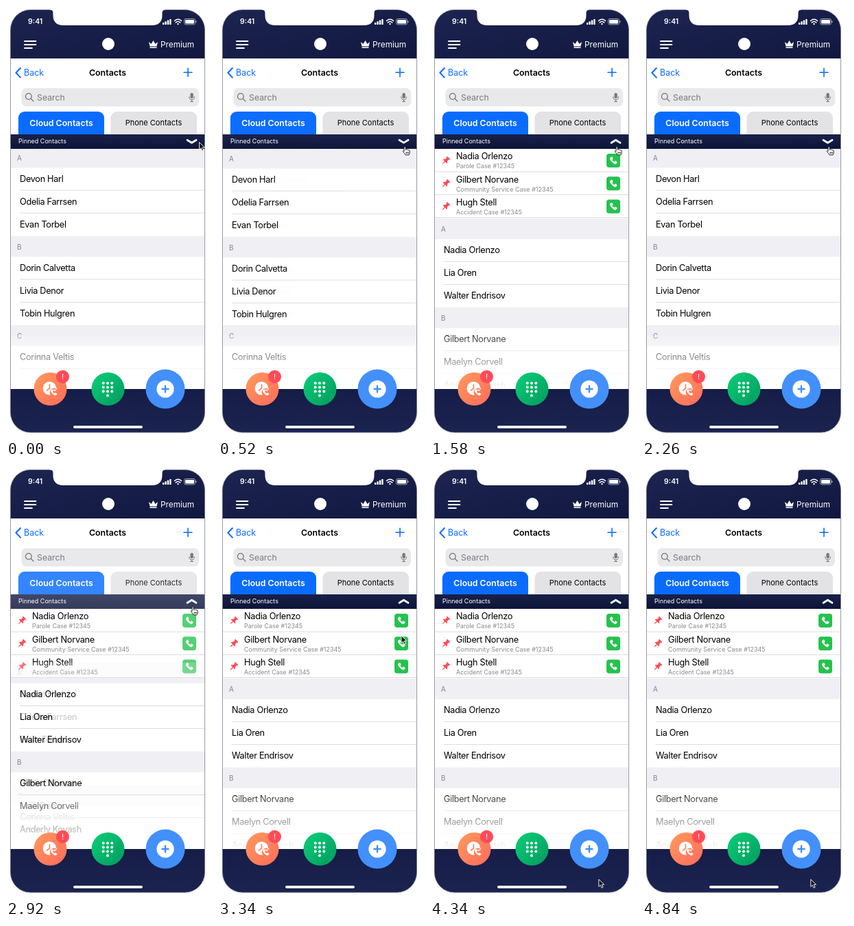
An HTML page for the animation above (4.86 s loop, 300 px wide and 626 px high).

```html
<!DOCTYPE html>
<html>
<head>
<meta charset="utf-8">
<style>
html, body { margin: 0; width: 100%; height: 100%; overflow: hidden; background: #fff }
svg { display: block; font-family: Inter, sans-serif }
.line { fill: none; stroke-linecap: round; stroke-linejoin: round }
</style>
</head>
<body>
<svg id="stage" width="300" height="626" viewBox="0 0 300 626"></svg>
<script>
const LOOP = 4860, SHIFT = 103.3, FADE = 300;
const CLICKS = [520, 1660, 2803];
const BLUE = '#0a6cff';

const text = (x, y, size, str, attrs = '') =>
  `<text x="${x}" y="${y}" font-size="${size}" ${attrs}>${str}</text>`;
const rect = (x, y, w, h, fill, r = 0) =>
  `<rect x="${x}" y="${y}" width="${w}" height="${h}" rx="${r}" fill="${fill}"/>`;
const circle = (x, y, r, fill) => `<circle cx="${x}" cy="${y}" r="${r}" fill="${fill}"/>`;
const line = (d, color, width, attrs = '') =>
  `<path class="line" d="${d}" stroke="${color}" stroke-width="${width}" ${attrs}/>`;
const name = (y, str) => text(20, y, 12.8, str, 'letter-spacing="-.35"');
const rule = y => rect(20, y, 270, .8, '#d5d5da');
const gradient = (id, stops, dir = 'x2="0" y2="1"') =>
  `<linearGradient id="${id}" ${dir}>${stops.map(([at, color, alpha = 1]) =>
    `<stop offset="${at}" stop-color="${color}" stop-opacity="${alpha}"/>`).join('')}</linearGradient>`;

const handset = (x, y, scale, color) =>
  `<path transform="translate(${x} ${y}) scale(${scale})" fill="${color}" d="M-4.8-3.4L-3-5.2Q-2.3-5.7-1.7-5
   L-.5-3.1Q-.2-2.5-.7-2L-1.6-1.2Q-.8.6 1.2 1.6L2 .7Q2.5.2 3.1.5L5 1.7Q5.7 2.3 5.2 3L3.4 4.8
   Q1.7 5.6-1.7 2.2Q-5.6-1.7-4.8-3.4Z"/>`;

const section = (y, letter) =>
  rect(7, y - 15, 283, 30, '#efeff4') + text(16, y + 4, 10, letter, 'fill="#85858b"');

// Two lettered sections of three names each
function list(names) {
  let out = section(219.5, 'A') + section(348.5, 'B');
  names.forEach((n, i) => {
    const y = 255 + i % 3 * 33.1 + (i > 2 ? 129.1 : 0);
    out += name(y, n) + (i % 3 < 2 ? rule(y + 11.6) : '');
  });
  return out;
}

function pinned(title, detail, i) {
  const y = 207 + i * 33.2;
  return text(38, y + 15.4, 12.8, title, 'letter-spacing="-.3"') +
    text(38, y + 28.4, 9, detail, 'fill="#8a8a8f"') +
    `<g transform="translate(23 ${y + 17}) rotate(45)" fill="#ff4a55">
      <path d="M-3-6H3V-4.5L2-4V-1Q4 0 4 2H.6V6.5H-.6V2H-4Q-4 0-2-1V-4L-3-4.5Z"/></g>` +
    rect(7, y + 32.8, 283, .8, '#d5d5da');
}

const callButton = y => rect(257, y - 10, 20, 20, '#25c24e', 4) + handset(267, y, 1.05, '#fff');

const tabs = rect(18, 153, 125, 44, BLUE, 9) + rect(152.5, 153, 125.5, 44, '#e3e3e6', 9) +
  text(80.5, 174, 12.4, 'Cloud Contacts', 'fill="#fff" font-weight="600" text-anchor="middle"') +
  text(215, 173.4, 11, 'Phone Contacts', 'text-anchor="middle"') +
  rect(6.5, 186, 283, 21, 'url(#bar)') +
  text(18, 199.3, 9, 'Pinned Contacts', 'fill="#fff"');

const header = rect(6, 5, 284, 71, 'url(#top)') +
  text(32, 26, 10.6, '9:41', 'fill="#fff" font-weight="600"') +
  [0, 1, 2, 3].map(i => rect(228 + i * 3.4, 24 - i * 1.7, 2.4, 3 + i * 1.7, '#fff', .6)).join('') +
  line('M245.5 21.5Q250.5 17 255.5 21.5M247.3 23.9Q250.5 21 253.7 23.9', '#fff', 1.5) +
  circle(250.5, 26, 1.2, '#fff') +
  `<rect x="259.5" y="18.5" width="16" height="8.4" rx="2.4" fill="none" stroke="#aeb1c2" stroke-width=".9"/>` +
  rect(261, 20, 13, 5.4, '#fff', 1.2) + rect(276.4, 21.2, 1.2, 3, '#aeb1c2', .6) +
  line('M27 51H43.5M27 56H43.5M27 61H38', '#fff', 1.8) +
  circle(149, 55, 9, '#fff') +
  `<path fill="#fff" d="M208 52L211.5 55L214.5 50L217.5 55L221 52L219.5 58.5H209.5ZM209.5 59.5H219.5V61H209.5Z"/>` +
  text(225, 60, 11.8, 'Premium', 'fill="#fff"');

const toolbar = line('M21 90L14.5 96.8L21 103.6', BLUE, 2) +
  text(26, 101.3, 12.5, 'Back', `fill="${BLUE}"`) +
  text(148, 100.5, 12.4, 'Contacts', 'font-weight="600" text-anchor="middle"') +
  line('M259 96.3H271M265 90.3V102.3', BLUE, 1.6) +
  rect(22.5, 119, 258.5, 26.5, '#e9e9eb', 7) +
  line('M37.3 131a4.4 4.4 0 1 0-8.8 0a4.4 4.4 0 1 0 8.8 0M36.3 134.3L40 138', '#77777c', 1.3) +
  text(45, 136.6, 12.3, 'Search', 'fill="#7b7b81"') +
  rect(268.4, 126, 4.4, 8, '#77777c', 2.2) +
  line('M266.8 131.5Q266.8 136 270.6 136T274.4 131.5M270.6 136V138.5M268.6 138.5H272.6', '#77777c', 1);

const keypad = [...Array(10).keys()].map(i => i < 9
  ? circle(141.7 + i % 3 * 6.3, 546.5 + (i / 3 | 0) * 6, 2, '#fff')
  : circle(148, 564.5, 2, '#fff')).join('');

const footer = rect(6, 555, 284, 64, 'url(#bottom)') +
  circle(64.5, 555, 24, 'url(#orange)') + circle(63.5, 554, 9.8, '#fff') +
  line('M63.5 548.5V554L59.8 557', '#ff8657', 1.7) + circle(70, 560, 6.3, '#ff7d59') +
  handset(69.5, 560, .9, '#fff') + line('M69.5 556L71.2 557.6L74 554', '#fff', 1.1) +
  circle(82.5, 537.3, 9.5, '#ff4b57') +
  text(82.5, 541.3, 11, '!', 'fill="#fff" text-anchor="middle"') +
  circle(148.5, 555, 24, 'url(#green)') + keypad +
  circle(232, 555, 28.5, '#4390fb') + circle(232, 555, 12.6, '#fff') +
  line('M227.5 555H236.5M232 550.5V559.5', '#4390fb', 2.4) +
  rect(98, 608.3, 101, 3.6, '#fff', 1.8);

const closedNames = ['Devon Harl', 'Odelia Farrsen', 'Evan Torbel', 'Dorin Calvetta', 'Livia Denor', 'Tobin Hulgren'];
const openNames = ['Nadia Orlenzo', 'Lia Oren', 'Walter Endrisov', 'Gilbert Norvane', 'Maelyn Corvell', 'Anderly Kovash'];
const pins = [['Nadia Orlenzo', 'Parole'], ['Gilbert Norvane', 'Community Service'], ['Hugh Stell', 'Accident']];

const stage = document.getElementById('stage');
stage.innerHTML = `<defs>
  ${gradient('top', [[0, '#1c2450'], [1, '#111840']], 'x2="1" y2="1"')}
  ${gradient('bar', [[0, '#192149'], [1, '#0d1439']])}
  ${gradient('bottom', [[0, '#161d47'], [1, '#1b2350']])}
  ${gradient('orange', [[0, '#ff9a5c'], [1, '#ff6b5c']], 'x2="1" y2="1"')}
  ${gradient('green', [[0, '#0ccf78'], [1, '#029a5e']], 'x2="1" y2="1"')}
  ${gradient('veil', [[0, '#fff', .25], [.93, '#fff', .95], [1, '#fff', 1]])}
  <clipPath id="phone"><rect x="6.5" y="5.5" width="283" height="612.5" rx="29"/></clipPath>
  <clipPath id="view"><rect x="6" y="207" width="284" height="348"/></clipPath>
</defs>
<g clip-path="url(#phone)">
  ${header}${toolbar}
  <g clip-path="url(#view)">
    <g id="openView">
      <g id="openList">${list(openNames)}</g>
      ${rect(7, 207, 283, 99.5, '#fff')}
      ${pins.map(([who, kind], i) => pinned(who, kind + ' Case #12345', i)).join('')}
      <g id="calls">${pins.map((_, i) => callButton(224 + i * 33.2)).join('')}</g>
    </g>
  </g>
  <g id="openTabs">${tabs}</g>
  <g id="closed">
    <g clip-path="url(#view)">
      ${section(477.5, 'C')}${name(513, 'Corinna Veltis')}${rule(525)}
      <g id="closedList">${list(closedNames)}</g>
    </g>
    ${tabs}
  </g>
  ${line('', '#fff', 2.8, 'id="chevron"')}
  ${rect(7, 478, 283, 77, 'url(#veil)')}
  ${footer}
</g>
<rect x="6.5" y="5.5" width="283" height="612.5" rx="29" fill="none" stroke="#7d8194" stroke-width=".8"/>
<path fill="#fff" d="M64 4H232V5.5Q227.5 5.5 227.5 10V13Q227.5 28 212.5 28H83.5Q68.5 28 68.5 13V10Q68.5 5.5 64 5.5Z"/>
<g id="cursor" stroke-width=".9" stroke-linejoin="round">
  <path id="arrow" fill="#111" stroke="#fff" d="M0 0V10.5L2.5 8.3L4.3 12.3L6.2 11.5L4.5 7.6H7.8Z"/>
  <path id="hand" fill="#fff" stroke="#111" d="M1.5 1Q1.5-.3 2.6-.3T3.7 1V4.2Q5 3.4 5.8 4.5Q7.1 3.9 7.8 5Q9.5 4.5 9.7 6.2V8.5
    Q9.5 10 8.6 11.8H3.6Q2.7 9.8.4 7.7Q-.8 6.2.3 5.8Q1 5.7 1.5 6.5ZM4.5 7.5V9.8M6.2 7.5V9.8M7.8 7.5V9.8"/>
</g>`;

const el = Object.fromEntries([...stage.querySelectorAll('g[id], path[id]')].map(e => [e.id, e]));
const clamp = v => Math.max(0, Math.min(1, v));
const easeOut = v => 1 - (1 - clamp(v)) ** 3;
const easeInOut = v => (v = clamp(v)) * v * (3 - 2 * v);
const fade = (id, alpha) => el[id].setAttribute('opacity', alpha);
const move = (id, x, y) => el[id].setAttribute('transform', `translate(${x} ${y})`);

function draw(t) {
  // Each click toggles the pinned panel
  const p = CLICKS.reduce((sum, at, i) => sum + (i % 2 ? -1 : 1) * easeOut((t - at) / FADE), 0);
  const solid = clamp(p * 1.3);
  fade('openView', solid);
  fade('calls', p);
  fade('openTabs', p);
  fade('closed', 1 - p);
  move('openList', 0, SHIFT * p);
  move('closedList', 0, SHIFT * p);
  const bend = 2 - 4 * solid;
  el.chevron.setAttribute('d', `M264 ${196.2 - bend}L270.5 ${196.2 + bend}L277 ${196.2 - bend}`);

  const enter = easeInOut(t / 360), leave = easeInOut((t - 3240) / 500);
  const x = 281.5 - 12 * enter - 23.7 * leave;
  const y = 197.5 + 6.5 * enter + 395 * leave;
  const pointing = t > 180 && y < 212;
  move('cursor', x, y);
  fade('hand', +pointing);
  fade('arrow', +!pointing);
}

const start = performance.now();
function tick() {
  draw((performance.now() - start) % LOOP);
  requestAnimationFrame(tick);
}
tick();
</script>
</body>
</html>
```
